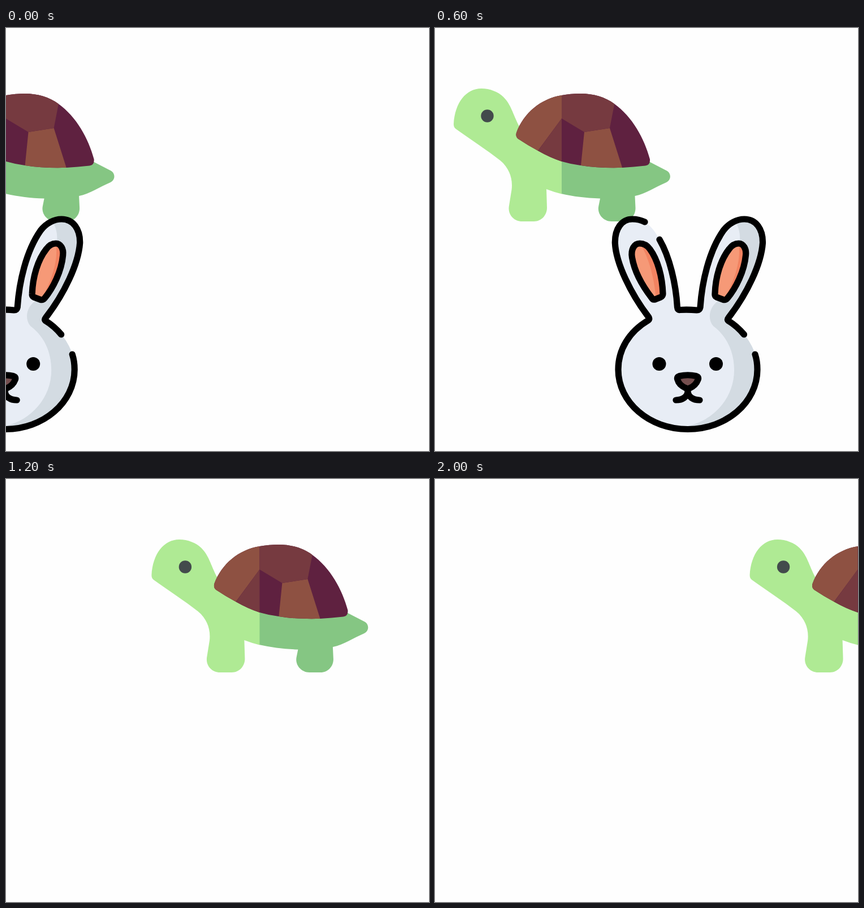
An HTML page that plays this animation: 748x748 px, repeating every 2.1 s.

```html
<!DOCTYPE html>
<html>
<head>
<meta charset="utf-8">
<title>Turtle and rabbit</title>
<style>
html, body { margin: 0; width: 100%; height: 100%; overflow: hidden; background: #fefefe; }
svg { display: block; width: 100%; height: 100%; }
.line { fill: none; stroke: #000; stroke-width: 11.2; stroke-linecap: round; stroke-linejoin: round; }
</style>
</head>
<body>
<svg viewBox="0 0 748 748">
  <defs>
    <clipPath id="shell">
      <path d="M144 185C157 150 187 125 224 119C235 117 247 116 258 116C280 116 301 122 317 134C349 157 370 195 380 232Q381 242 372 243.5C358 245 345 246 331 247C306 247.500 281 247 258 243Q241 241 224 236Q203 229 182 217Q165 208 147 196Q142 192 144 185Z"/>
    </clipPath>
    <clipPath id="head"><path class="head"/></clipPath>
    <clipPath id="earL"><path class="earL"/></clipPath>
    <clipPath id="earR"><path class="earR"/></clipPath>
  </defs>

  <g id="turtle">
    <path fill="#85c683" d="M223 200H340L380 237L410 252.500C418 257 418 269 409 273C390 281 373 293 353.500 297L354.500 318C355 331 345 342 332 342H312C297 342 286 328 289.500 314L292 301.500C268 301 245 298 223 293Z"/>
    <path fill="#afea94" d="M33 170C35 132 55 107 82 107C97 107 112 113 121 122C135 136 137 151 149 174L224 200V293.500Q210 290 197 285L198 318C198 331 188 342 175 342H154C139 342 128 329 131 314L135.500 286C138 266 131 247 115 234C92 216 63 197 37 178.500Q33 176 33 170Z"/>
    <circle cx="92.5" cy="155.500" r="11.2" fill="#434b4c"/>
    <g clip-path="url(#shell)">
      <path fill="#5f2140" d="M140 110H390V250H140Z"/>
      <path fill="#8e5142" d="M140 110H224V160L182 217L170 230H140ZM264 184L309 177L333 253H257Z"/>
      <path fill="#763a40" d="M224 110H322L309 177L264 184L224 160ZM224 160V245H162Z"/>
    </g>
  </g>

  <g id="rabbit">
    <path class="head" fill="#e8edf5"/>
    <path clip-path="url(#head)" fill="#d3dbe2" d="M527 336C539 352 541 368 538 385L502 482C485 492 481 514 492 527C516 545 529 572 529 605C529 655 492 694 447 704V720H600V330Z"/>
    <path class="earL" fill="#f28361"/>
    <path clip-path="url(#earL)" fill="#f69977" d="M362 381C376 400 388 440 391 482H340V381Z"/>
    <path class="earR" fill="#f28361"/>
    <path clip-path="url(#earR)" fill="#f69977" d="M537 381C542 412 528 452 508 485H490V381Z"/>
    <path class="earL line"/>
    <path class="earR line"/>
    <path id="outline" class="line"/>
    <circle cx="396.500" cy="594" r="12"/>
    <circle cx="497" cy="594" r="12"/>
    <path class="line" style="fill:#754f4f" d="M432 615.500Q447 612 462 615.500Q467 617 465 622C462 630 457 634 450 637Q447 638.500 444 637C437 634 431 630 429 622Q427 617 432 615.500Z"/>
    <path class="line" d="M426 658C438 658 446 652 447 643V638V643C448 652 456 658 468 658"/>
  </g>
</svg>
<script>
const $ = id => document.getElementById(id);

// Two outline strokes; the filled head also bridges the gaps between them.
const leftSide = 'M371 343C364 339.500 357 338 349 338C330 338 318 355 318.300 380C320 416 346 470 378 511.500' +
  'Q380 515 377 517C343 537 324 569 324 604C324 662 379 709.500 447 709.500C515 709.500 570 662 570 604C570 595 569 586 566 577';
const rightSide = 'C538 532 529 524 519 518Q516 516 518.500 513C552 470 577 417 579.500 380C580 356 568 338 547 338' +
  'C534 338 520 345 510 358C484 395 472 450 469 494Q468 499 463 499C452 498 441 498 433 498.500' +
  'Q429 499 428.500 494C426 452 415 405 397 374';
const shapes = {
  head: leftSide + 'C562 564 555 552 546.500 542' + rightSide + 'C390 361 382 350 371 343Z',
  earL: 'M362 381C352 381 346 392 348.500 406C353 432 366 455 383 477Q385 481 389 480L399 476Q403 474 403 470C402 440 394 410 380 391C375 384 368 381 362 381Z',
  earR: 'M537 381C545 381 551 390 549.500 402C547 430 532 460 517 478Q514 481.500 510 480.500L498 476Q494.500 474 495 470C496 440 505 410 520 391C525 384 531 381 537 381Z'
};
for (const name in shapes)
  document.querySelectorAll('.' + name).forEach(p => p.setAttribute('d', shapes[name]));
$('outline').setAttribute('d', leftSide + 'M546.500 542' + rightSide);

// Both animals advance every 100 ms; the rabbit is twice as fast.
const STEP = 37.4, COUNT = 21, HOME = 6;
const place = (id, x) => $(id).setAttribute('transform', `translate(${x} 0)`);

function draw(now) {
  const n = Math.floor(now / 100) % COUNT - HOME;
  place('turtle', n * STEP);
  place('rabbit', n * STEP * 2);
  requestAnimationFrame(() => draw(performance.now() - start));
}
const start = performance.now();
draw(0);
</script>
</body>
</html>
```
